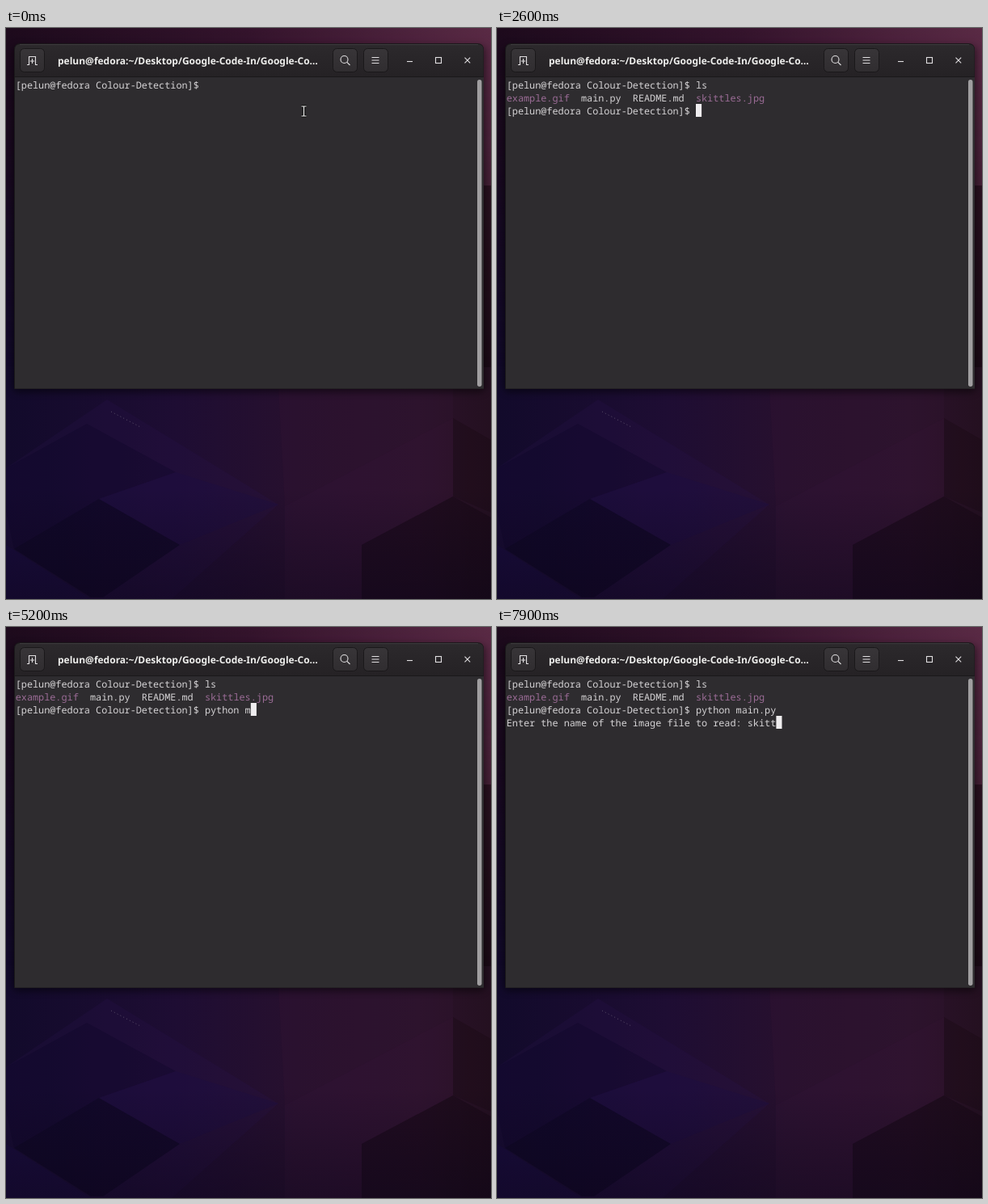
Recreate the animation shown at these times as an HTML page. Size 600x707 px, loop 8000 ms.

```html
<!DOCTYPE html>
<html lang="en">
<head>
<meta charset="utf-8">
<title>Terminal session</title>
<style>
  html, body { margin: 0; width: 100%; height: 100%; overflow: hidden; background: #190b25; }
  svg { display: block; width: 100vw; height: 100vh; }
  text { white-space: pre; text-rendering: geometricPrecision; }
  .term { font: 11.83px "Noto Sans Mono", "DejaVu Sans Mono", monospace; fill: #d5d3d5; }
  .title { font: bold 12px "Noto Sans", "Open Sans", sans-serif; fill: #eeeeec; }
  .media { fill: #9b6c96; }
  .button { fill: url(#button); stroke: #1a181a; }
  .icon { fill: none; stroke: #e2e0e2; stroke-width: 1.1; }
</style>
</head>
<body>
<svg viewBox="0 0 600 707" preserveAspectRatio="none">
  <defs>
    <linearGradient id="sky">
      <stop offset="0" stop-color="#120a2b"/>
      <stop offset=".35" stop-color="#1e0d33"/>
      <stop offset=".6" stop-color="#27102e"/>
      <stop offset=".85" stop-color="#2b122b"/>
      <stop offset="1" stop-color="#241020"/>
    </linearGradient>
    <linearGradient id="glow">
      <stop offset="0" stop-color="#1d0a1c"/>
      <stop offset=".5" stop-color="#34132c"/>
      <stop offset="1" stop-color="#5a2a45"/>
    </linearGradient>
    <linearGradient id="fade" x2="0" y2="1">
      <stop offset="0" stop-color="#fff"/>
      <stop offset=".35" stop-color="#bbb"/>
      <stop offset="1" stop-color="#000"/>
    </linearGradient>
    <linearGradient id="floor" x2="0" y2="1">
      <stop offset="0" stop-color="#0c0518" stop-opacity="0"/>
      <stop offset="1" stop-color="#0c0518" stop-opacity=".45"/>
    </linearGradient>
    <linearGradient id="bar" x2="0" y2="1">
      <stop offset="0" stop-color="#2c292c"/>
      <stop offset="1" stop-color="#252225"/>
    </linearGradient>
    <linearGradient id="button" x2="0" y2="1">
      <stop offset="0" stop-color="#383538"/>
      <stop offset="1" stop-color="#302d30"/>
    </linearGradient>
    <mask id="topFade"><rect width="600" height="420" fill="url(#fade)"/></mask>
    <filter id="blur" x="-10%" y="-10%" width="120%" height="120%"><feGaussianBlur stdDeviation="5"/></filter>
  </defs>

  <g id="wallpaper">
    <rect width="600" height="707" fill="url(#sky)"/>
    <rect width="600" height="420" fill="url(#glow)" mask="url(#topFade)"/>
    <path d="M590 195H600V420H590Z" fill="#14070f" opacity=".55"/>
    <path d="M0 545L125 460L337 590L205 707H0Z" fill="#2a1650" opacity=".22"/>
    <path d="M0 598V545L100 490L210 550L115 583L10 645Z" fill="#0d0626" opacity=".3"/>
    <path d="M10 645L115 583L215 640L120 705H105Z" fill="#0a0520" opacity=".6"/>
    <path d="M0 640L105 707H0Z" fill="#1c1050" opacity=".3"/>
    <path d="M210 550L337 590L215 640L115 583Z" fill="#1d0d42" opacity=".4"/>
    <path d="M337 447H553V483L345 592Z" fill="#341433" opacity=".3"/>
    <path d="M345 592L553 483V580L440 640V707H345Z" fill="#3a1739" opacity=".28"/>
    <path d="M553 483L600 510V600L553 580Z" fill="#14070f" opacity=".3"/>
    <path d="M440 640L553 580L600 606V707H440Z" fill="#12070f" opacity=".42"/>
    <rect y="570" width="600" height="137" fill="url(#floor)"/>
    <path d="M130 475L168 495" stroke="#6c6278" stroke-dasharray="1 3.3" opacity=".8"/>
  </g>

  <g id="window">
    <rect x="8" y="22" width="585" height="429" rx="8" fill="#000" opacity=".5" filter="url(#blur)"/>
    <path d="M10 447V27Q10 19 18 19H583Q591 19 591 27V447Z" fill="#1a181a"/>
    <path d="M11 60V27Q11 20 18 20H583Q590.500 20 590.500 27V60Z" fill="url(#bar)"/>
    <path d="M17 20.500H584" stroke="#3d3a3d"/>
    <rect x="11" y="61" width="580" height="385.500" fill="#2e2c2f"/>
    <rect x="583" y="64" width="5.500" height="380" rx="2.700" fill="#a09ea0"/>
    <rect class="button" x="17.500" y="25.500" width="30" height="29" rx="5"/>
    <rect class="button" x="404.500" y="25.500" width="30" height="29" rx="5"/>
    <rect class="button" x="442.500" y="25.500" width="30" height="29" rx="5"/>
    <g class="icon">
      <path d="M26 45.500H28.500V35.500H36.500V45.500H39M32.500 38V44M29.800 41H35.200"/>
      <circle cx="418.500" cy="39" r="4.500"/>
      <path d="M421.800 42.300L425.500 46"/>
      <path d="M452.500 36.500H461.500M452.500 40H461.500M452.500 43.500H461.500"/>
      <path d="M496 41.500H503"/>
      <rect x="531.500" y="36.500" width="7" height="7"/>
      <path d="M567.500 36.700L574.200 43.400M574.200 36.700L567.500 43.400"/>
    </g>
    <text class="title" x="64" y="44.500">pelun@fedora:~/Desktop/Google-Code-In/Google-Co…</text>
  </g>

  <g class="term">
    <text class="row" x="11.700" y="74.500"></text>
    <text id="listing" x="11.700" y="90.500"><tspan class="media">example.gif</tspan>  main.py  README.md  <tspan class="media">skittles.jpg</tspan></text>
    <text class="row" x="11.700" y="106.500"></text>
    <text class="row" x="11.700" y="122.500"></text>
  </g>
  <rect id="caret" width="7.100" height="16" fill="#efedef"/>
  <g id="pointer" fill="none">
    <path d="M365.500 97H371.500M368.500 97V109M365.500 109H371.500" stroke="#111" stroke-width="3.400"/>
    <path d="M365.500 97H371.500M368.500 97V109M365.500 109H371.500" stroke="#eee" stroke-width="1.200"/>
  </g>
</svg>
<script>
  const LOOP = 8000, BLINK = 600, LEFT = 11.7, TOP = 62, ADVANCE = 7.1, LINE = 16;
  const LIST_AT = 1200, RUN_AT = 6000;
  const prompt = "[pelun@fedora Colour-Detection]$ ";
  const question = "Enter the name of the image file to read: ";

  // One entry per text row: [time, content] pairs
  const typing = (prefix, text, times) =>
    times.map((time, i) => [time, prefix + text.slice(0, i + 1)]);
  const scripts = [
    [[0, prompt], ...typing(prompt, "ls", [600, 800])],
    [[LIST_AT, prompt],
      ...typing(prompt, "python ma", [4200, 4400, 4500, 4600, 4800, 4900, 5000, 5100, 5300]),
      [5500, prompt + "python main.py "]],
    [[6600, question], ...typing(question, "skitt", [7300, 7400, 7500, 7700, 7800])]
  ];
  const caretLines = [0, 2, 3];
  const resets = [100, RUN_AT, ...scripts.flat().map(([time]) => time)]
    .filter(time => time && time !== 6600);

  const rows = document.querySelectorAll(".row");
  const [listing, caret, pointer] = ["listing", "caret", "pointer"].map(id => document.getElementById(id));
  const show = (node, on) => node.setAttribute("visibility", on ? "visible" : "hidden");

  function draw(t) {
    const lines = scripts.map(steps => steps.reduce((text, [time, next]) => t >= time ? next : text, ""));
    lines.forEach((text, i) => {
      if (rows[i].textContent !== text) rows[i].textContent = text;
    });
    const active = t < LIST_AT ? 0 : t < RUN_AT ? 1 : 2;
    const lastReset = Math.max(...resets.filter(time => time <= t));
    caret.setAttribute("x", LEFT + lines[active].length * ADVANCE);
    caret.setAttribute("y", TOP + caretLines[active] * LINE);
    show(caret, t >= 100 && Math.floor((t - lastReset) / BLINK) % 2 === 0);
    show(listing, t >= LIST_AT);
    show(pointer, t < 600);
  }

  const start = performance.now();
  function tick() {
    draw((performance.now() - start) % LOOP);
    requestAnimationFrame(tick);
  }
  tick();
</script>
</body>
</html>
```
